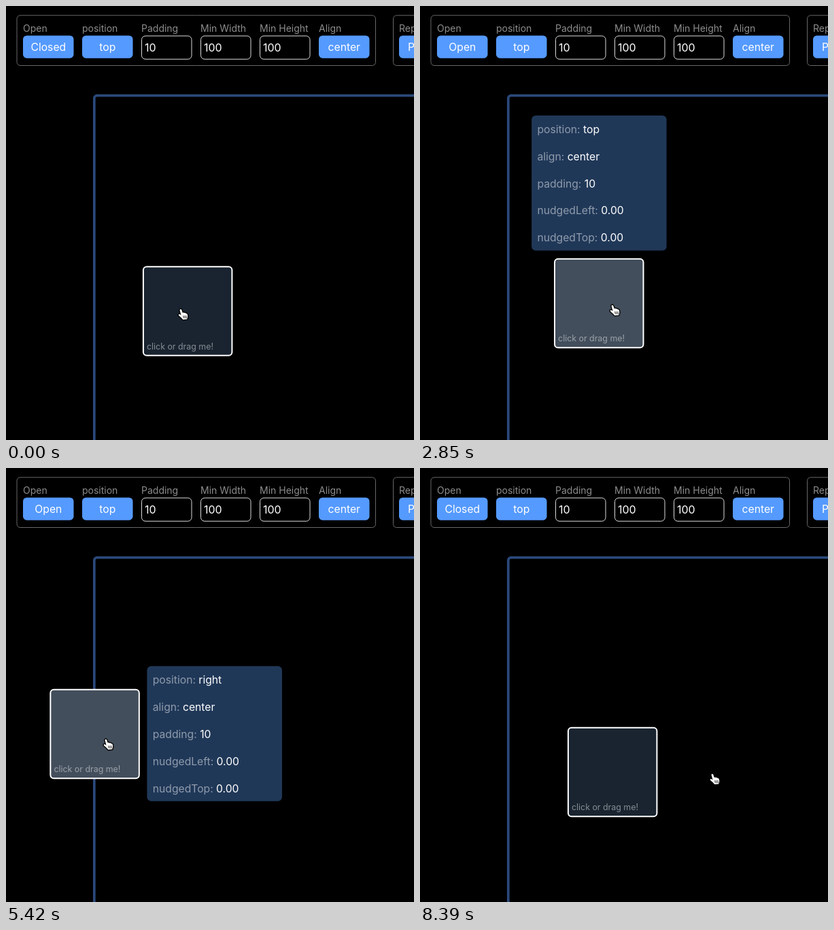
An HTML page with a canvas that plays this animation: 600 px wide and 638 px high, repeating every 8.42 s.

```html
<!DOCTYPE html>
<html lang="en">
<head>
<meta charset="utf-8">
<title>Popover demo</title>
<style>
  html, body { margin: 0; width: 100%; height: 100%; overflow: hidden; background: #000; }
  canvas { display: block; width: 600px; height: 638px; }
</style>
</head>
<body>
<canvas id="stage" width="600" height="638"></canvas>
<script>
const ctx = document.getElementById('stage').getContext('2d');
const LOOP = 8420;
const GRAB = 500, RELEASE = 7500, CLOSE = 8150;
const LAG = 30;
const SIZE = 132, PANEL = 198.5, LIMIT = 137.97, TOP_LIMIT = 139;

// Pointer path: time, x, y
const path = [
  [0, 260, 453], [45, 261, 453], [210, 261, 453], [GRAB, 288, 461],
  [1300, 190, 463.5], [1790, 111.4, 453], [1820, 105.5, 451], [1850, 106, 451],
  [1890, 106, 452.5], [2820, 284, 449.5], [2850, 286, 447], [3050, 292, 438],
  [3580, 300, 458], [3910, 302, 461.5], [3940, 301, 461], [4440, 272, 477],
  [5390, 151.5, 403.5], [5420, 150, 406], [6150, 207, 464], [6360, 212.11, 469.5],
  [6390, 212.5, 470], [6420, 221, 469], [6500, 238, 468], [7000, 298, 460],
  [RELEASE, 304, 459.5], [7550, 304, 459.5], [8000, 428, 457], [8300, 433, 457], [LOOP, 433, 457]
];

const clamp = (v, lo, hi) => Math.min(hi, Math.max(lo, v));

function slope(i, axis) {
  if (i <= 0 || i >= path.length - 1) return 0;
  const rate = k => (path[k + 1][axis] - path[k][axis]) / (path[k + 1][0] - path[k][0]);
  const a = rate(i - 1), b = rate(i);
  return a * b <= 0 ? 0 : 2 * a * b / (a + b);
}

// Monotone cubic interpolation, so the pointer never overshoots a turning point
function pointer(t) {
  let i = 0;
  while (i < path.length - 2 && t >= path[i + 1][0]) i++;
  const a = path[i], b = path[i + 1], span = b[0] - a[0];
  const u = clamp((t - a[0]) / span, 0, 1), u2 = u * u, u3 = u2 * u;
  const at = k => (2 * u3 - 3 * u2 + 1) * a[k] + (u3 - 2 * u2 + u) * span * slope(i, k)
    + (3 * u2 - 2 * u3) * b[k] + (u3 - u2) * span * slope(i + 1, k);
  return { x: at(1), y: at(2) };
}

function boxAt(t) {
  const p = pointer(clamp(t - LAG, GRAB, RELEASE));
  return { x: p.x - 87, y: p.y - 79 };
}

function rect(x, y, w, h, r, fill, stroke, line = 1) {
  ctx.beginPath();
  ctx.roundRect(x, y, w, h, r);
  if (fill) { ctx.fillStyle = fill; ctx.fill(); }
  if (stroke) { ctx.strokeStyle = stroke; ctx.lineWidth = line; ctx.stroke(); }
}

function text(str, x, y, size, color, align = 'left') {
  ctx.font = `${size}px Inter, sans-serif`;
  ctx.textAlign = align;
  ctx.fillStyle = color;
  ctx.fillText(str, x, y);
  return ctx.measureText(str).width;
}

function button(x, label) {
  rect(x, 43.5, 74.5, 33.2, 5.5, '#559afe');
  text(label, x + 37.3, 66.2, 15.7, '#fff', 'center');
}

function input(x, value) {
  rect(x + 0.5, 44, 73.5, 34.2, 5.5, '#000', '#dcdcdc');
  text(value, x + 5, 67.2, 16, '#fff');
}

function toolbar(open) {
  rect(16, 13.8, 527.5, 73.7, 5, null, '#686868');
  rect(569.5, 13.8, 200, 73.7, 5, null, '#686868');
  const fields = [
    ['Open', button, open ? 'Open' : 'Closed'], ['position', button, 'top'],
    ['Padding', input, '10'], ['Min Width', input, '100'],
    ['Min Height', input, '100'], ['Align', button, 'center']
  ];
  fields.forEach(([label, control, value], i) => {
    const x = 25 + i * 87;
    text(label, x, 38.4, 14, '#8c8c8c');
    control(x, value);
  });
  text('Rep', 578, 38.4, 14, '#8c8c8c');
  rect(578, 43.5, 74.5, 33.2, 5.5, '#559afe');
  text('P', 591, 66.2, 15.7, '#fff');
}

function popover(box, t) {
  const onTop = box.y - 209.5 >= TOP_LIMIT;
  const nudge = onTop ? Math.max(0, LIMIT - (boxAt(t - LAG).x - 33)) : 0;
  const x = onTop ? Math.max(LIMIT, box.x - 33) : box.x + 143;
  const y = onTop ? box.y - 209.5 : box.y - 33.3;
  rect(x, y, PANEL, PANEL, 6, '#203858');
  const rows = [
    ['position', onTop ? 'top' : 'right'], ['align', 'center'], ['padding', '10'],
    ['nudgedLeft', nudge.toFixed(2)], ['nudgedTop', '0.00']
  ];
  rows.forEach(([name, value], i) => {
    const baseline = y + 25.9 + i * 39.85;
    const width = text(name + ': ', x + 8.3, baseline, 15.7, '#8f9bab');
    text(value, x + 8.3 + width, baseline, 15.7, '#fff');
  });
}

function hand({ x, y }) {
  const outline = [
    [-4.6, -6.3], [-3.2, -7.5], [-1.8, -6.4], [-0.3, -2], [1, -2.6], [2.3, -1.7],
    [3.6, -2], [4.7, -0.9], [6, -0.8], [7, 1], [7.2, 4], [6.2, 7.5], [0.2, 8],
    [-2, 5.5], [-6, 2], [-6.3, 0.4], [-4.8, 0], [-2.5, 1.6]
  ];
  ctx.save();
  ctx.translate(x, y);
  ctx.lineJoin = ctx.lineCap = 'round';
  ctx.beginPath();
  outline.forEach(p => ctx.lineTo(...p));
  ctx.closePath();
  ctx.strokeStyle = '#000';
  ctx.lineWidth = 2.6;
  ctx.stroke();
  ctx.fillStyle = '#fff';
  ctx.fill();
  ctx.lineWidth = 0.8;
  ctx.beginPath();
  for (const dx of [0.7, 2.8, 4.9]) {
    ctx.moveTo(dx, 2.5);
    ctx.lineTo(dx + 0.6, 5.8);
  }
  ctx.stroke();
  ctx.restore();
}

function draw(t) {
  const open = t >= GRAB && t < CLOSE;
  const dragging = t >= GRAB && t < RELEASE;
  const box = boxAt(t);
  ctx.fillStyle = '#000';
  ctx.fillRect(0, 0, 600, 638);
  toolbar(open);
  rect(129.8, 131.6, 700, 700, 4, null, '#2a497a', 3.7);
  if (open) popover(box, t);
  rect(box.x + 0.9, box.y + 1.2, SIZE - 1.5, SIZE - 1.5, 5, dragging ? '#434e5c' : '#192430', '#fff', 2);
  text('click or drag me!', box.x + 6, box.y + 122.7, 12.4, dragging ? '#98a0a9' : '#858c94');
  hand(pointer(t));
}

function frame(now) {
  draw(now % LOOP);
  requestAnimationFrame(frame);
}
requestAnimationFrame(frame);
</script>
</body>
</html>
```
